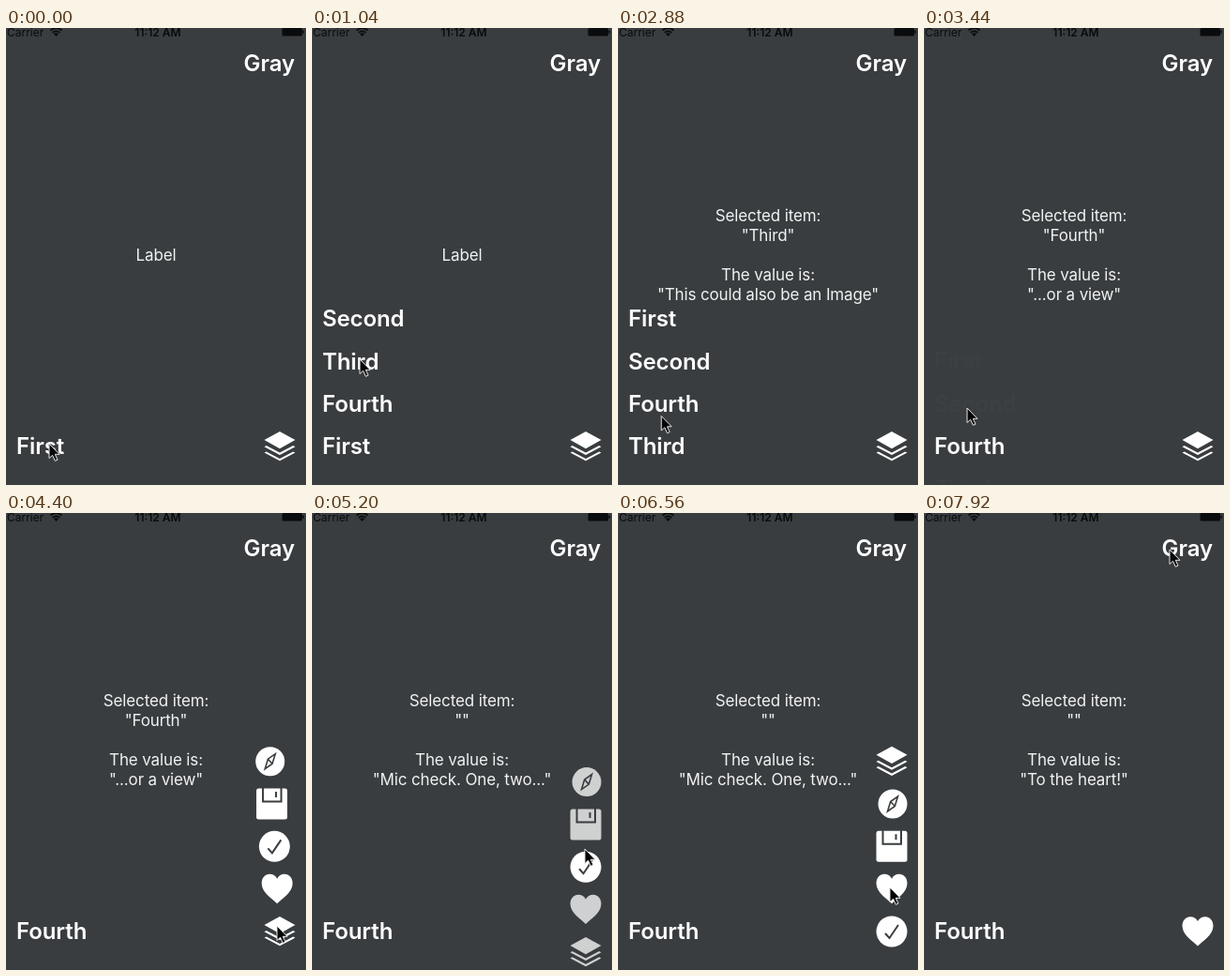
Write an HTML page that moves like this. It is 320 by 487 pixels and loops after 8 s.

```html
<!DOCTYPE html>
<html lang="en">
<head>
<meta charset="utf-8">
<title>Corner menus</title>
<style>
  html, body { margin: 0; width: 100%; height: 100%; overflow: hidden; background: #393d40; }
  svg { display: block; width: 100%; height: 100%; font-family: Inter, Roboto, sans-serif; }
  .status { font-size: 12px; fill: #0a0b0c; }
  .item { font-size: 24px; font-weight: 600; letter-spacing: -.004em; fill: #fff; }
  .label { font-size: 17px; letter-spacing: -.008em; fill: #f1f2f2; text-anchor: middle; }
  .icon { fill: #fff; }
  .cut { fill: none; stroke: #393d40; stroke-width: 2; }
</style>
</head>
<body>
<svg viewBox="0 0 320 487">
  <defs>
    <g id="layers" class="icon">
      <path d="M0-16 16.5-7 0 2.3-16.5-7Z"/>
      <path id="sheet" d="M-16.5 .3-14.3-.9 0 6.6 14.3-.9 16.5 .3 0 9Z"/>
      <use href="#sheet" y="6.3"/>
    </g>
    <g id="compass" class="icon">
      <circle cx="1" r="15.5"/>
      <path class="cut" style="stroke-width:1.6" d="M6.5-8 3.3 2.5-4.5 8-1.300-2.500ZM-1.300-2.500 3.300 2.500"/>
    </g>
    <g id="disk" class="icon">
      <rect x="-16.5" y="-16.5" width="33" height="33" rx="2.5"/>
      <path class="cut" d="M-9.5-17V-2.5H10V-17M4.5-13V-7"/>
    </g>
    <g id="check" class="icon">
      <circle r="16.5"/>
      <path class="cut" d="M-7 2-2.5 7 7-7"/>
    </g>
    <g id="heart" class="icon">
      <path d="M0 15.5C-5 10-16.5 4-16.5-6C-16.5-12-12.5-15.8-8-15.8C-4.500-15.8-1.500-14 0-11C1.500-14 4.500-15.8 8-15.8C12.500-15.8 16.500-12 16.500-6C16.500 4 5 10 0 15.5Z"/>
    </g>
  </defs>
  <rect width="320" height="487" fill="#393d40"/>
  <g class="status">
    <text x="1" y="8.5">Carrier</text>
    <text x="162" y="8.5" text-anchor="middle" font-weight="600">11:12 AM</text>
    <path fill="none" stroke="#0a0b0c" stroke-width="1.7" d="M47.5 2.5Q53.5-2.5 59.5 2.5M49.7 5Q53.5 1.8 57.3 5"/>
    <path d="M51 6.3Q53.5 4.3 56 6.3L53.5 9Z"/>
    <rect x="294.5" y="0" width="21.5" height="8.5" rx="1.5"/>
    <rect x="316.5" y="2.5" width="1.5" height="3.5" rx=".7"/>
  </g>
  <text class="item" x="308" y="46" text-anchor="end">Gray</text>
  <g id="message"></g>
  <g id="menus"></g>
  <path id="cursor" d="M0 0V15.5L3.6 12.3 6.3 18.3 9 17.1 6.3 11.3H11Z" fill="#050505" stroke="#e8e8e8"/>
</svg>
<script>
const LOOP = 8000, STEP = 80, BASE = 446, GAP = 45.33;
const SLIDE = 9.5, OPEN_MS = 300, PICK_MS = 250;
const NS = "http://www.w3.org/2000/svg";
const $ = id => document.getElementById(id);

function add(parent, tag, attrs, text = "") {
  const el = document.createElementNS(NS, tag);
  for (const key in attrs) el.setAttribute(key, attrs[key]);
  el.textContent = text;
  return parent.appendChild(el);
}

const clamp = v => Math.min(1, Math.max(0, v));
const easeOut = v => 1 - (1 - v) ** 3;
const easeInOut = v => v * v * (3 - 2 * v);

const menus = [
  {
    x: 11, side: 1, names: ["First", "Second", "Third", "Fourth"], first: "First",
    rounds: [{ open: 390, pick: 1230, name: "Third" }, { open: 2241, pick: 3205, name: "Fourth" }],
    make: name => add($("menus"), "text", { class: "item", y: 8.3 }, name)
  },
  {
    x: 292, side: -1, names: ["layers", "compass", "disk", "check", "heart"], first: "layers",
    rounds: [{ open: 4300, pick: 5120, name: "check" }, { open: 5900, pick: 7070, name: "heart" }],
    make: name => add($("menus"), "use", { href: "#" + name })
  }
];
for (const menu of menus) menu.nodes = menu.names.map(menu.make);

const report = (item, value) => ["Selected item:", `"${item}"`, "", "The value is:", `"${value}"`];

const messages = [
  [0, ["Label"]],
  [1230, report("Third", "This could also be an Image")],
  [3205, report("Fourth", "...or a view")],
  [5120, report("", "Mic check. One, two...")],
  [7070, report("", "To the heart!")]
].map(([start, lines]) => {
  const group = add($("message"), "g", { class: "label" });
  lines.forEach((line, i) =>
    add(group, "text", { x: 160, y: 248.2 + (i - (lines.length - 1) / 2) * 21 }, line));
  return { start, group };
});

// Pointer moves: start, end, x, y
const moves = [
  [0, 1, 46, 443],
  [520, 1040, 51, 353],
  [1480, 2000, 47, 445],
  [2500, 3040, 46, 405],
  [3600, 4160, 289, 440],
  [4440, 4960, 291, 358],
  [5320, 5760, 289, 440],
  [6040, 6400, 290, 399],
  [7520, 7920, 262, 39]
];

function drawMenu(menu, t) {
  let current = menu.first, round = null;
  for (const r of menu.rounds) {
    if (t >= r.pick + PICK_MS) current = r.name;
    else if (t >= r.open) { round = r; break; }
  }
  const stack = [current, ...menu.names.filter(n => n !== current).reverse()];
  const opened = round ? clamp((t - round.open) / OPEN_MS) : 0;
  const picked = round ? easeInOut(clamp((t - round.pick) / PICK_MS)) : 0;
  const drop = round ? picked * stack.indexOf(round.name) * GAP : 0;

  menu.names.forEach((name, i) => {
    const slot = stack.indexOf(name);
    const x = menu.x + menu.side * slot * SLIDE * (1 - easeOut(opened));
    const y = BASE - slot * GAP + drop;
    let opacity = slot ? clamp(opened * 5) : 1;
    if (round && name !== round.name) opacity *= 1 - picked;
    menu.nodes[i].setAttribute("transform", `translate(${x} ${y})`);
    menu.nodes[i].setAttribute("opacity", opacity);
  });
}

function drawCursor(t) {
  let [, , x, y] = moves[0];
  for (const [start, end, toX, toY] of moves) {
    const k = easeInOut(clamp((t - start) / (end - start)));
    x += (toX - x) * k;
    y += (toY - y) * k;
  }
  $("cursor").setAttribute("transform", `translate(${x} ${y})`);
}

function draw(time) {
  const t = Math.floor(time % LOOP / STEP) * STEP;
  menus.forEach(menu => drawMenu(menu, t));
  const shown = messages.filter(m => t >= m.start).pop();
  for (const m of messages) m.group.setAttribute("display", m === shown ? "inline" : "none");
  drawCursor(t);
}

const began = performance.now();
function tick() {
  draw(performance.now() - began);
  requestAnimationFrame(tick);
}
tick();
</script>
</body>
</html>
```
